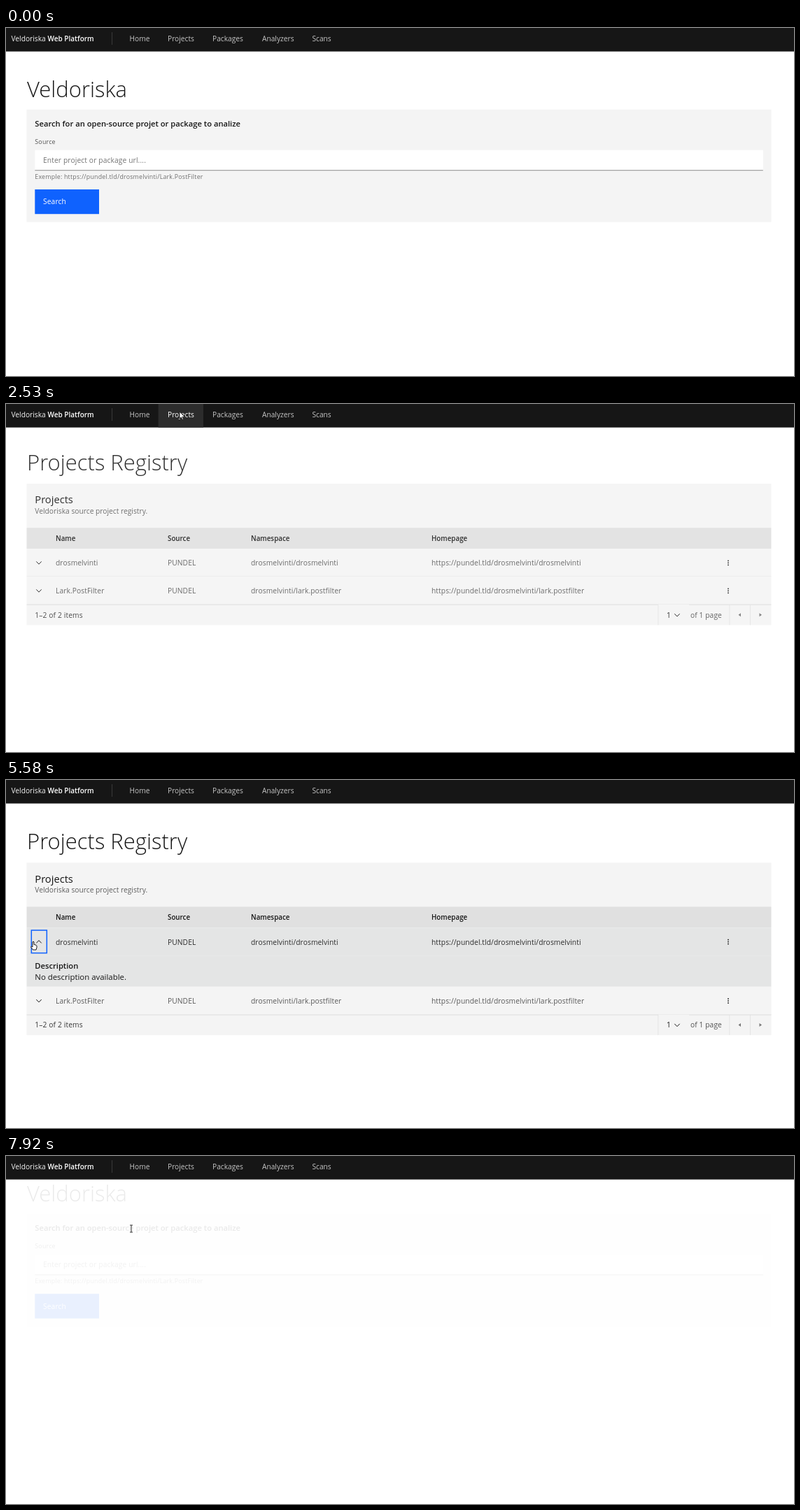
Recreate the animation shown at these times as an HTML page. Size 1126 px wide and 498 px high, loop 8000 ms.

```html
<!DOCTYPE html>
<html lang="en">
<head>
<meta charset="utf-8">
<title>Project registry</title>
<style>
  html, body { margin: 0; height: 100%; overflow: hidden; background: #fff; }
  svg { display: block; width: 100vw; height: 100vh; font-family: "Open Sans", "Noto Sans", sans-serif; }
  text { white-space: pre; }
</style>
</head>
<body>
<svg id="stage" viewBox="0 0 1126 498"></svg>
<script>
const LOOP = 8000;
const INK = '#161616', GREY = '#525252', BLUE = '#0f62fe';
const BRAND = 'Veldoriska', HOST = 'https://pundel.tld/', USER = 'drosmelvinti', REPO = 'Lark.PostFilter';

// Screen updates: first time, last time, count
const RUNS = [
  [400, 1140, 11], [1220, 1510, 5], [1800, 2230, 7], [2380, 2670, 5],
  [3110, 3910, 12], [3980, 4130, 3], [4630, 5070, 7], [5290, 5290, 1],
  [5430, 5580, 3], [6150, 6150, 1], [6300, 7030, 11], [7110, 7110, 1], [7330, 7920, 9]
];

// Pointer: time, x, y, shape
const POINTER = [
  [400, 990, 459, 'arrow'], [1140, 268, 46, 'arrow'], [1510, 248, 11, 'arrow'],
  [3040, 248, 11, 'arrow'], [3600, 160, 228, 'beam'], [3830, 150, 262, 'beam'],
  [3980, 145, 245, 'beam'], [4130, 139, 271, 'beam'], [4560, 139, 271, 'beam'],
  [5070, 39, 231, 'hand'], [6080, 39, 231, 'hand'], [6150, 38, 226, 'hand'],
  [6300, 38, 226, 'arrow'], [7030, 177, 14, 'arrow'], [7480, 177, 14, 'arrow'],
  [7920, 179, 104, 'beam']
];

const SHAPES = {
  arrow: '<path d="M0 0V10L2.3 7.9 4 11.4 5.5 10.8 3.9 7.2H7Z" fill="#fff" stroke="#000" stroke-width=".7"/>',
  beam: '<path d="M-2-5H2M0-5V5M-2 5H2" fill="none" stroke="#333"/>',
  hand: '<path d="M-1 6.5V.8Q0-.8 1 .8V4.5L4 5.2Q5.3 5.7 5 8.5L4 12H-.5L-3.5 8Q-3 6-1 8Z" fill="#fff" stroke="#000" stroke-width=".9"/>'
};

const clamp = v => Math.max(0, Math.min(1, v));
const part = (t, a, b) => clamp((t - a) / (b - a));
const smooth = p => (1 - Math.cos(Math.PI * p)) / 2;
const easeOut = p => 1 - (1 - p) ** 3;

function snap(t) {
  let last = 0;
  for (const [a, b, n] of RUNS) {
    if (t < a) break;
    const step = n > 1 ? (b - a) / (n - 1) : 1;
    last = Math.min(b, a + Math.floor((t - a) / step + 0.1) * step);
  }
  return last;
}

function pointerAt(t) {
  if (t < POINTER[0][0]) return null;
  let i = POINTER.length - 1;
  while (POINTER[i][0] > t) i--;
  const a = POINTER[i], b = POINTER[i + 1] || a;
  const p = a === b ? 0 : smooth(part(t, a[0], b[0]));
  return { x: a[1] + (b[1] - a[1]) * p, y: a[2] + (b[2] - a[2]) * p, shape: a[3] };
}

const rect = (x, y, w, h, fill) => `<rect x="${x}" y="${y}" width="${w}" height="${h}" fill="${fill}"/>`;
const path = (d, stroke = INK) => `<path d="${d}" fill="none" stroke="${stroke}"/>`;
// y is the middle of the line box
const text = (s, x, y, size = 10.26, fill = INK, weight = 400, spacing = 0) =>
  `<text x="${x}" y="${y + size * 0.388}" font-size="${size}" fill="${fill}" font-weight="${weight}" letter-spacing="${spacing}">${s}</text>`;
const title = s => text(s, 30, 87, 31, INK, 300);
const chevron = (x, y, flip = 1) => path(`M${x - 3.7} ${y - 1.9 * flip}L${x} ${y + 1.9 * flip} ${x + 3.7} ${y - 1.9 * flip}`);

function header(right, hover) {
  const items = [['Home', 176.5], ['Projects', 231], ['Packages', 295], ['Analyzers', 366], ['Scans', 437.5]];
  return rect(0, 0, right, 33.6, INK) +
    (hover ? rect(217.6, 0, 64.4, 33.6, '#2c2c2c') : '') +
    text(BRAND, 7.5, 15.5, 10.2, '#f4f4f4') +
    text('Web Platform', 59.5, 15.5, 10, '#fff', 600) +
    rect(151, 6, 1, 18, '#393939') +
    items.map(([s, x]) => text(s, x, 15.2, 10.2, hover && s === 'Projects' ? '#fff' : '#c6c6c6')).join('');
}

function home(edge) {
  return title(BRAND) +
    rect(29.5, 116.7, edge - 29.5, 161, '#f4f4f4') +
    text('Search for an open-source projet or package to analize', 41.3, 136.7, 11.2, INK, 600) +
    text('Source', 41.3, 162.3, 8.8, GREY, 400, 0.23) +
    rect(41.3, 174.7, edge - 53, 29, '#fff') +
    rect(41.3, 203.2, edge - 53, 1, '#8d8d8d') +
    text('Enter project or package url....', 53, 189.2, 10.26, '#757575', 400, 0.12) +
    text(`Exemple: ${HOST}${USER}/${REPO}`, 41.3, 212.7, 8.8, '#6f6f6f', 400, 0.23) +
    rect(41.3, 231, 91.7, 35.2, BLUE) +
    text('Search', 53, 248.3, 10.26, '#fff', 400, 0.12);
}

function tableRow(y, name, edge, col, hot, open) {
  const ink = hot ? '#2d2d2d' : '#5a5a5a';
  const cells = [[name, 71], ['PUNDEL', 231], [`${USER}/${name.toLowerCase()}`, 350], [`${HOST}${USER}/${name.toLowerCase()}`, 608]];
  return rect(29.5, y, edge - 29.5, 40, hot ? '#e4e5e5' : '#f4f4f4') +
    rect(29.5, y + 39.3, edge - 29.5, 0.7, '#e4e4e4') +
    chevron(47, y + 20.2, 1 - 2 * open) +
    cells.map(([s, x]) => text(s, col(x), y + 20.3, 10.26, ink, 400, 0.08)).join('') +
    [-3, 0, 3].map(d => rect(col(1032) - 0.8, y + 19.5 + d, 1.6, 1.6, INK)).join('');
}

function pager(y, edge) {
  const at = x => x + edge - 1093.5;
  const line = x => rect(at(x), y, 0.8, 29.3, '#e0e0e0');
  return rect(29.5, y, edge - 29.5, 29.3, '#f4f4f4') +
    rect(29.5, y, at(932) - 29.5, 0.8, '#e0e0e0') +
    rect(at(976), y, edge - at(976), 0.8, '#e0e0e0') +
    text('1–2 of 2 items', 41.3, y + 14.7, 10.26, '#393939', 400, 0.12) +
    line(931.5) + line(1033.5) + line(1063) +
    text('1', at(944), y + 14.7) + chevron(at(959), y + 15) +
    text('of 1 page', at(978), y + 14.7, 10.26, GREY, 400, 0.08) +
    `<path d="M${at(1050)} ${y + 12.2}v5l-3.5-2.5ZM${at(1076.5)} ${y + 12.2}v5l3.5-2.5Z" fill="#777"/>`;
}

function projects(edge, row, open, focus) {
  const k = (edge - 29.5) / 1064;
  const col = x => 71 + (x - 71) * k;
  const drop = 44.5 * open;
  return title('Projects Registry') +
    rect(29.5, 118.3, edge - 29.5, 63, '#f4f4f4') +
    text('Projects', 41.3, 141, 14.7) +
    text(`${BRAND} source project registry.`, 41.3, 157.2, 10.26, '#5f5f5f') +
    rect(29.5, 181.3, edge - 29.5, 30, '#e0e0e0') +
    [['Name', 71], ['Source', 231], ['Namespace', 350], ['Homepage', 608]]
      .map(([s, x]) => text(s, col(x), 196.2, 9.8, INK, 600)).join('') +
    tableRow(211.3, USER, edge, col, row === 1 || open > 0, open) +
    (open ? rect(29.5, 251.3, edge - 29.5, drop, '#e4e5e5') + `<g opacity="${open}">` +
      text('Description', 41.3, 265.2, 11.2, INK, 600) +
      text('No description available.', 41.3, 282, 11.4) + '</g>' : '') +
    tableRow(251.3 + drop, REPO, edge, col, row === 2, 0) +
    pager(291.3 + drop, edge) +
    (focus ? `<rect x="36.3" y="215" width="22" height="32.6" fill="none" stroke="${BLUE}" stroke-width="1.5"/>` : '');
}

const scrollbar = () => rect(1117, 0, 9, 498, '#f1f1f1') +
  rect(1118, 11, 8, 437.5, '#c1c1c1') +
  '<path d="M1119.5 6.5h5l-2.5-3Z" fill="#777"/>';

function draw(t) {
  const onList = t >= 2371 && t < 7911;
  const narrow = (t >= 1800 && t < 2371) || (t >= 7400 && t < 7911);
  const edge = narrow ? 1081.3 : 1093.5;
  let shown = 1;
  if (t >= 7911) shown = easeOut(part(t, 7911, 8210));
  else if (t >= 7400) shown = 1 - smooth(part(t, 7400, 7830));
  else if (t >= 2371) shown = easeOut(part(t, 2371, 2670));
  else if (t >= 1800) shown = 1 - smooth(part(t, 1800, 2230));

  const open = smooth(part(t, 5360, 5580)) * (1 - smooth(part(t, 6230, 6450)));
  const p = pointerAt(t);
  const hover = p && p.y < 34 && p.x > 218 && p.x < 282;
  const row = !p || p.y < 211 || p.y > 291 ? 0 : p.y < 251 ? 1 : 2;
  const page = onList ? projects(edge, row, open, t >= 5290 && t < 7330) : home(edge);

  return `<g opacity="${shown}" transform="translate(0 ${-37 * (1 - shown)})">${page}</g>` +
    header(narrow ? 1117 : 1126, hover) +
    (narrow ? scrollbar() : '') +
    (p ? `<g transform="translate(${p.x} ${p.y})">${SHAPES[p.shape]}</g>` : '');
}

const stage = document.getElementById('stage');
const start = performance.now();
let drawn = -1;
function tick() {
  const t = snap((performance.now() - start) % LOOP);
  if (t !== drawn) stage.innerHTML = draw(drawn = t);
  requestAnimationFrame(tick);
}
tick();
</script>
</body>
</html>
```
